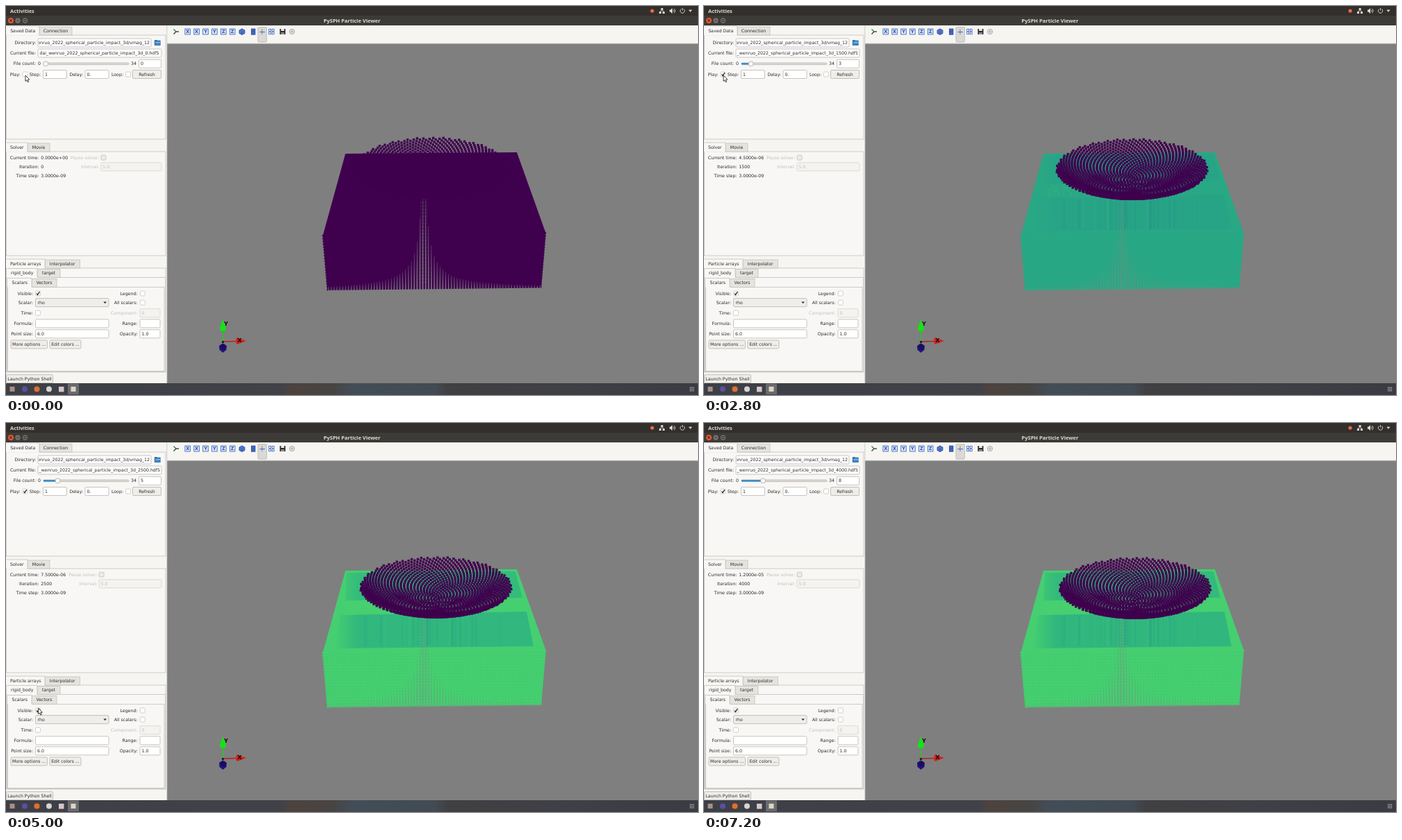
Animation, 997 px wide and 561 px high, one loop 8 s. Source, as an HTML page with a canvas:

```html
<!DOCTYPE html>
<html lang="en">
<head>
<meta charset="utf-8">
<title>PySPH Particle Viewer</title>
<style>
html, body { margin: 0; width: 100%; height: 100%; overflow: hidden; background: #7f7f7f; }
canvas { display: block; width: 997px; height: 561px; }
</style>
</head>
<body>
<canvas id="c" width="997" height="561"></canvas>
<script>
const g = document.getElementById('c').getContext('2d');
const LOOP = 8000, STEP = 100;
const UI = '6.25px "DejaVu Sans", sans-serif';
const BOLD = 'bold 7.5px "Noto Sans", "Open Sans", sans-serif';
const INK = '#2b2b2b', DIM = '#c3c0ba', LINE = '#c4c1bb', PANEL = '#f6f5f2', GREY = '#7f7f7f', PURPLE = '#3f004e';
const RUN = 'dai_wenruo_2022_spherical_particle_impact_3d';

// start time of every loaded file and the drift of the particle bowl in it
const LOADS = [0, 1000, 1800, 2800, 3700, 4600, 5500, 6400, 7200];
const SHIFT = [-2, -1, 0, 1.2, 3, 4, 4.8, 5.3, 5.7];
// front face, darker zones of the top face
const TONES = [[PURPLE, PURPLE], [PURPLE, PURPLE], ['#94e73e', '#94e73e'], ['#28a884', '#27a386'],
  ['#35c27a', '#29ab83'], ['#45cf70', '#2fb57f'], ['#45cf70', '#2eb47f']];

function rng(seed) {
  return () => (seed = (seed * 16807) % 2147483647) / 2147483647;
}
const unit = v => Math.max(0, Math.min(1, v));

function box(x, y, w, h, fill, stroke) {
  g.fillStyle = fill;
  g.fillRect(x, y, w, h);
  if (stroke) {
    g.strokeStyle = stroke;
    g.lineWidth = 0.8;
    g.strokeRect(x, y, w, h);
  }
}
function poly(pts, fill, stroke) {
  g.beginPath();
  for (let i = 0; i < pts.length; i += 2) g.lineTo(pts[i], pts[i + 1]);
  g.closePath();
  g.fillStyle = fill;
  g.fill();
  if (stroke) { g.strokeStyle = stroke; g.lineWidth = 0.8; g.stroke(); }
}
function disc(x, y, r, fill, stroke) {
  g.beginPath();
  g.arc(x, y, r, 0, 7);
  if (fill) { g.fillStyle = fill; g.fill(); }
  if (stroke) { g.strokeStyle = stroke; g.lineWidth = 0.8; g.stroke(); }
}
function line(x1, y1, x2, y2, color, w = 1) {
  g.strokeStyle = color;
  g.lineWidth = w;
  g.beginPath();
  g.moveTo(x1, y1);
  g.lineTo(x2, y2);
  g.stroke();
}
function text(s, x, y, color = INK, font = UI, align = 'left') {
  g.font = font;
  g.textAlign = align;
  g.textBaseline = 'middle';
  g.fillStyle = color;
  g.fillText(s, x, y + 0.4);
}
function round(x, y, w, h, fill, stroke) {
  g.beginPath();
  g.roundRect(x, y, w, h, 1.5);
  g.fillStyle = fill;
  g.fill();
  g.strokeStyle = stroke;
  g.lineWidth = 0.8;
  g.stroke();
}
function field(x, y, w, s = '', off = false, right = false) {
  round(x, y - 6, w, 12, off ? '#f4f3f0' : '#fff', off ? '#d6d3cd' : '#bab6b0');
  g.save();
  g.beginPath();
  g.rect(x + 1, y - 6, w - 2, 12);
  g.clip();
  text(s, right ? x + w - 2 : x + 2.5, y, off ? DIM : INK, UI, right ? 'right' : 'left');
  g.restore();
}
function button(x, y, w, s) {
  round(x, y - 6, w, 12, '#f0eeea', '#b6b2ab');
  text(s, x + w / 2, y, INK, UI, 'center');
}
function check(x, y, on, off) {
  round(x - 3.5, y - 3.5, 7, 7, off ? '#eeece8' : '#fff', off ? '#bfbbb5' : '#c8c5bf');
  if (!on) return;
  g.strokeStyle = '#222';
  g.lineWidth = 1.3;
  g.beginPath();
  g.moveTo(x - 2, y);
  g.lineTo(x - 0.6, y + 2);
  g.lineTo(x + 2.4, y - 2.3);
  g.stroke();
}
function tabs(y, bottom, x1, x2, x3, a, b, right = 230) {
  box(x1, y + 13, right - x1, bottom - y - 13, '#f8f7f5', LINE);
  box(x2, y + 1, x3 - x2, 12, '#e6e4df', LINE);
  box(x1, y, x2 - x1, 13.6, '#f8f7f5');
  line(x1, y, x2, y, LINE, 0.8);
  line(x2, y, x2, y + 13, LINE, 0.8);
  text(a, (x1 + x2) / 2, y + 6.5, INK, UI, 'center');
  text(b, (x2 + x3) / 2, y + 6.8, INK, UI, 'center');
}
const label = (s, x, y, color) => text(s, x, y, color, UI, 'right');

function drawBars() {
  box(0, 0, 997, 14, '#332f2c');
  box(0, 14, 997, 14, '#3c3b37');
  text('Activities', 6, 7, '#dcd9d4', BOLD);
  text('PySPH Particle Viewer', 498.5, 21, '#dfdbd2', BOLD, 'center');
  disc(7, 21, 4, '#e9572f');
  text('×', 7, 20.6, '#3a2018', 'bold 7px "DejaVu Sans", sans-serif', 'center');
  disc(17, 21, 3.7, '#74716a');
  disc(27.5, 21, 3.7, '#74716a');
  line(15.3, 21, 18.7, 21, '#3c3b37');
  g.strokeStyle = '#3c3b37';
  g.strokeRect(26, 19.5, 3, 3);

  const tray = '#dedad4';
  disc(931, 7, 2.6, '#ec6a45');
  box(943.6, 3, 3, 3, tray);
  box(941, 8, 3, 3, tray);
  box(946, 8, 3, 3, tray);
  line(942.5, 7, 947.5, 7, tray, 0.8);
  poly([956, 5.5, 957.5, 5.5, 960, 3, 960, 11, 957.5, 8.5, 956, 8.5], tray);
  g.strokeStyle = tray;
  g.lineWidth = 0.9;
  for (const r of [2, 4]) { g.beginPath(); g.arc(960, 7, r, -0.9, 0.9); g.stroke(); }
  g.beginPath();
  g.arc(974.5, 7, 3.2, -1, 4.1);
  g.stroke();
  line(974.5, 2.8, 974.5, 6.5, tray, 0.9);
  poly([983.5, 5.5, 988.5, 5.5, 986, 8.7], tray);

  const bar = g.createLinearGradient(0, 0, 997, 0);
  [[0, '#3d3f47'], [0.4, '#414248'], [0.41, '#4d433e'], [0.47, '#474442'], [0.5, '#434d57'],
    [0.62, '#424b53'], [0.64, '#403f41'], [0.8, '#3f4046'], [1, '#3b3c43']].forEach(s => bar.addColorStop(...s));
  g.fillStyle = bar;
  g.fillRect(0, 544, 997, 17);
  box(89, 544.5, 16, 15.5, '#6a6b70');
  box(5.5, 549, 7, 7, '#a88f80');
  disc(27, 552.5, 4, '#5a4fa0');
  disc(44.5, 552.5, 4, '#e0702c');
  disc(62, 552.5, 4, '#d8d3d3');
  box(76, 549, 7.5, 7.5, '#d6c6c6');
  box(93.5, 549, 7, 7, '#ddd6c0');
  for (let i = 0; i < 9; i++) box(985.2 + (i % 3) * 2.3, 549.6 + (i / 3 | 0) * 2.3, 1.4, 1.4, '#b3b3b6');
}

function drawToolbar() {
  box(232, 28, 765, 26, PANEL);
  line(232, 54, 997, 54, '#d9d7d2');
  line(241.5, 33.5, 245, 37, '#2d7d2d', 1.3);
  line(241.5, 40.5, 245, 37, '#333', 1.3);
  line(244, 37, 249, 37, '#2f6b2f', 1.6);
  [...'XXYYZZ'].forEach((s, i) => {
    const x = 261.7 + i * 12.9;
    box(x - 3.8, 33, 7.6, 8, '#dfe8fa', '#2f5cb8');
    text(s, x, 37, '#1f4fb5', 'bold 6.5px "DejaVu Sans", sans-serif', 'center');
  });
  poly([336, 35, 340, 32.8, 344, 35, 344, 39.5, 340, 41.5, 336, 39.5], '#4a75d0', '#2b4c9c');
  line(340, 37, 340, 41, '#2b4c9c', 0.8);
  box(353.5, 33, 5.5, 3.6, '#3d68c8', '#2b4c9c');
  box(353.5, 37.6, 5.5, 3.6, '#3d68c8', '#2b4c9c');
  round(363, 30.5, 12.5, 21.5, '#dbd9d5', '#b9b6b0');
  line(365.5, 37.5, 373, 37.5, '#3d68c8');
  line(369, 33.5, 369, 41, '#5580a8');
  for (const x of [378.7, 383.2]) for (const y of [33.3, 37.7]) box(x, y, 3, 3, '#f6f8fd', '#3260bd');
  box(394.5, 33, 8, 8, '#27272b');
  box(396.2, 33, 4.6, 3, '#e8e8e8');
  box(396, 38, 5, 3, '#8b8b90');
  disc(412, 37, 3.6, '#f0efec', '#8f8e8b');
  disc(412, 37, 1.3, null, '#8f8e8b');
}

function drawPanel(n, playing) {
  box(0, 28, 232, 516, PANEL);
  line(231.8, 28, 231.8, 543, '#d2cfc9');
  tabs(29, 192, 0.5, 48, 95, 'Saved Data', 'Connection');
  label('Directory:', 43, 53);
  field(46, 53, 163, RUN + '/vmag_12', false, true);
  box(214.2, 50, 8, 6.5, '#3f86c4', '#2b6ba6');
  box(214.2, 49, 3.5, 1.5, '#2b6ba6');
  box(216, 52.2, 6.6, 1, '#a8d0ee');
  label('Current file:', 43, 68);
  field(46, 68, 178, RUN + '_' + n * 500 + '.hdf5', false, n > 0);
  label('File count:', 43, 83.3);
  text('0', 46, 83.3);
  round(54, 82, 123, 2.6, '#dddad5', '#b9b6b0');
  const knob = 57.2 + n * 3.47;
  if (n) box(54, 82, knob - 54, 2.6, '#3c8fc9');
  disc(knob, 83.3, 3.5, '#fbfaf8', '#aaa69f');
  text('34', 180, 83.3);
  field(191.5, 83.3, 32, String(n));
  label('Play:', 20.5, 98.5);
  check(27.5, 98.5, playing);
  label('Step:', 50, 98.5);
  field(53.5, 98.5, 34, '1');
  label('Delay:', 111, 98.5);
  field(114, 98.5, 34, '0.');
  label('Loop:', 169, 98.5);
  check(176, 98.5);
  button(182.5, 98.5, 41, 'Refresh');

  tabs(197, 360, 0.5, 31, 63, 'Solver', 'Movie');
  const dx = n ? 0 : 2.8;
  const time = n ? (n * 1.5e-6).toExponential(4).replace(/-(\d)$/, '-0$1') : '0.0000e+00';
  label('Current time:', 47.5, 218.6);
  text(time, 50.2, 218.6);
  label('Pause solver:', 131.5 + dx, 218.6, DIM);
  check(137.6 + dx, 218.6, false, true);
  label('Iteration:', 47.5, 231.8);
  text(String(n * 500), 50.2, 231.8);
  label('Interval:', 131.5 + dx, 231.8, DIM);
  field(134 + dx, 231.8, 90 - dx, '5.0', true);
  label('Time step:', 47.5, 244.7);
  text('3.0000e-09', 50.2, 244.7);

  tabs(365, 528, 0.5, 56, 106.5, 'Particle arrays', 'Interpolator');
  tabs(378.5, 527.5, 1.5, 45, 78, 'rigid_body', 'target', 229.5);
  tabs(392.5, 526.5, 2.5, 37, 73, 'Scalars', 'Vectors', 228);
  label('Visible:', 39, 414.5);
  check(46, 414.5, true);
  label('Legend:', 189.5, 414.5);
  check(196.8, 414.5);
  label('Scalar:', 39, 427.7);
  button(42.5, 427.7, 105.5, '');
  text('rho', 45.5, 427.7);
  poly([140.3, 426.6, 145, 426.6, 142.7, 429.2], '#333');
  label('All scalars:', 189.5, 427.7);
  check(196.8, 427.7);
  label('Time:', 39, 442.7);
  check(46, 442.7);
  label('Component:', 189.5, 442.7, DIM);
  field(193, 442.7, 29, '0', true);
  label('Formula:', 39, 457.9);
  field(42.5, 457.9, 105.5);
  label('Range:', 189.5, 457.9);
  field(193, 457.9, 29);
  label('Point size:', 39, 472.9);
  field(42.5, 472.9, 105.5, '6.0');
  label('Opacity:', 189.5, 472.9);
  field(193, 472.9, 29, '1.0');
  button(7, 488, 52.5, 'More options ...');
  button(63, 488, 45, 'Edit colors ...');
  button(0.5, 537.7, 67, 'Launch Python Shell');
}

function drawTopFace(n, face, shade) {
  const rnd = rng(77);
  const tint = g.createLinearGradient(473, 0, 760, 0);
  [[0, face], [0.12, shade], [0.6, shade], [1, shade]].forEach(s => tint.addColorStop(...s));
  g.globalAlpha = 0.75;
  poly([491, 216, 734, 214, 744, 252, 489, 256], tint);
  g.globalAlpha = 0.9;
  poly([482, 277, 750, 272, 760, 322, 473, 325], tint);
  for (let i = 0; i < 60; i++) {
    const x = 617 + (rnd() + rnd() - 1) * 115;
    g.globalAlpha = 0.16 * rnd();
    line(x, 279, x, 322, i % 3 ? '#1f6f90' : '#55d880', 1.5);
  }
  g.globalAlpha = n > 3 ? 0.1 : 0.04;
  g.setLineDash([1.6, 2.6]);
  for (let i = 0; i < 75; i++) {
    const u = i / 74;
    line(458 + u * 317, 333 - u * 3, 464 + u * 306, 408 - u * 3, '#157a66', 1.2);
  }
  g.setLineDash([]);
}

function drawBlock(n) {
  const [face, shade] = TONES[Math.min(n, 6)];
  const lit = n > 1, rnd = rng(31);
  poly([489, 213, 736, 211, 777.5, 327, 771, 406.5, 463, 410, 456.5, 331], face);
  for (let i = 0; i <= 19; i++) {
    box(455.5 + i * 0.36, 330 + i * 4.1, 3, 2.6, face);
    box(775.2 - i * 0.36, 326 + i * 4.1, 3, 2.6, face);
  }
  if (n > 2) drawTopFace(n, face, shade);
  if (lit) {
    g.globalAlpha = 0.4;
    for (let i = 0; i < 70; i++) box(492 + rnd() * 70, 258 + rnd() * 14, 1.2, 1, n > 2 ? '#7fdc55' : '#b9ee8a');
  }

  // gaps between the particle columns widen towards the bottom centre
  for (let i = 0; i < 75; i++) {
    const u = i / 74, x = 464.5 + u * 305, d = Math.abs(x - 602), y = 411.5 - u * 3.5;
    const h = Math.min(132, 900 / (d + 3)), w = 0.6 + 7 / (d + 22);
    g.globalAlpha = lit ? 0.7 : 1;
    poly([x - w, y, x + w, y, x + 0.15, y - h, x - 0.15, y - h], lit ? '#7d8f84' : GREY);
    if (!lit) continue;
    g.setLineDash([1.5, 2.7]);
    line(x, y, x, y - h, face, w * 1.6);
    g.setLineDash([]);
  }
  g.globalAlpha = 0.5;
  g.setLineDash([3, 2]);
  for (const x of [598, 602, 606]) line(x, 282, x, 400, '#85878a', 0.6);
  g.setLineDash([]);
  g.globalAlpha = 1;
}

// shallow bowl of particles on a golden-angle spiral
function drawBowl(n) {
  const s = SHIFT[n], cx = 615.3 + s, cy = 234.3 + s * 0.62, count = 1800;
  g.fillStyle = PURPLE;
  for (let i = 0; i < count; i++) {
    const r = Math.sqrt((i + 0.5) / count), a = i * 2.399963;
    const x = cx + 109 * r * Math.cos(a) + 2 * (1 - r * r);
    const y = cy + 43.3 * r * Math.sin(a) + 23 * (1 - r * r);
    g.fillRect(x - 1.65, y - 1.65, 3.3, 3.3);
  }
}

function drawAxes() {
  const font = 'bold 9px "Liberation Sans", Arial, sans-serif';
  line(312.5, 485, 312.5, 465, '#19d219', 1.3);
  line(313, 484, 333, 483.5, '#b92020', 1.3);
  poly([312.5, 452, 317.5, 466, 315, 468.5, 310, 468.5, 307.5, 466], '#12e612');
  poly([346, 483, 333, 488, 331.5, 486, 331.5, 480.5, 333, 478], '#cf2222');
  text('Y', 317, 458, '#000', font, 'center');
  text('X', 336.5, 481.8, '#000', font, 'center');
  poly([312.5, 486.5, 318, 490, 317.5, 496, 312.5, 500, 307.5, 496, 307, 490], '#22147c');
  disc(312.7, 491.5, 4, '#190d62');
  box(311, 483, 3, 3, '#222');
}

// the pointer drops fast from one checkbox to the other, then settles
function drawPointer(t) {
  const drop = 1 - (1 - unit((t - 4200) / 1100)) ** 4;
  const side = unit((t - 4500) / 500);
  g.save();
  g.translate(28 - 4 * drop + 22.5 * side * side * (3 - 2 * side), 100 + 313 * drop);
  g.lineJoin = 'round';
  poly([0, 0, 0, 8.4, 1.9, 6.8, 3.2, 9.8, 4.7, 9.1, 3.4, 6.2, 5.8, 6], '#fff', '#111');
  g.restore();
}

function draw(t) {
  let n = 0;
  while (n < 8 && t >= LOADS[n + 1]) n++;
  box(232, 28, 765, 516, GREY);
  drawBlock(n);
  drawBowl(n);
  drawAxes();
  drawToolbar();
  drawPanel(n, t >= 200);
  drawBars();
  const hidden = t >= 6400 || (t >= 1800 && t < 2100);
  if (!hidden) drawPointer(t);
}

const start = performance.now();
function tick() {
  const t = (performance.now() - start) % LOOP;
  draw(Math.floor(t / STEP) * STEP);
  requestAnimationFrame(tick);
}
tick();
</script>
</body>
</html>
```
